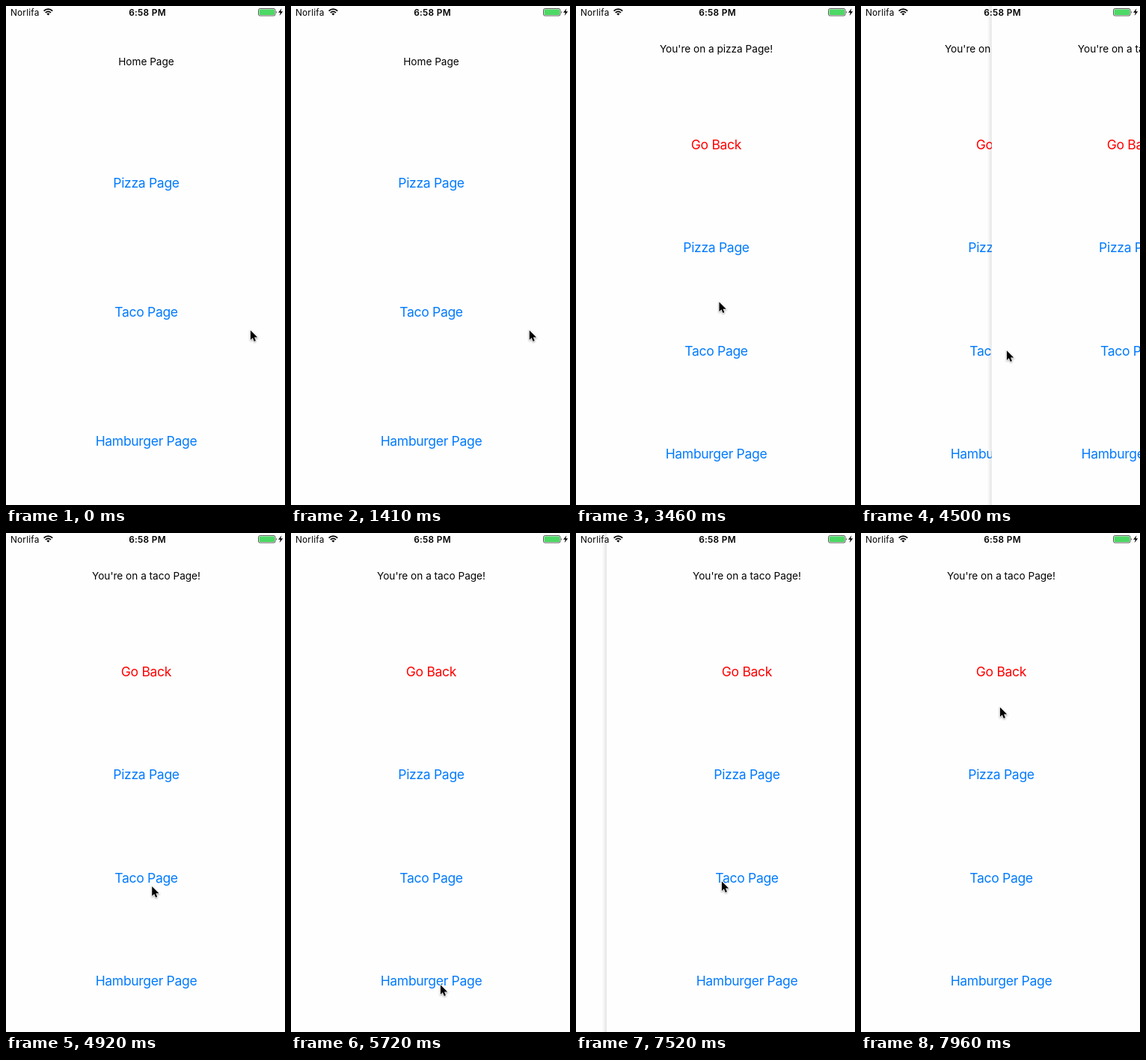
Recreate the animation shown at these times as an HTML page. Size 373 by 665 pixels, loop 8000 ms.

```html
<!DOCTYPE html>
<html lang="en">
<head>
<meta charset="utf-8">
<style>
html, body { margin: 0; width: 100%; height: 100%; overflow: hidden; background: #fefefe; }
svg { display: block; width: 373px; height: 665px; font-family: Inter, Roboto, sans-serif; }
.title { font-size: 13.6px; text-anchor: middle; }
.button { font-size: 17.5px; letter-spacing: -.3px; text-anchor: middle; fill: #007aff; }
.back { fill: #f00; }
.status { font-size: 11.8px; letter-spacing: .2px; }
.clock { font-weight: 600; text-anchor: middle; letter-spacing: .3px; }
#cursor { filter: drop-shadow(0 1px 1px rgba(0, 0, 0, .35)); }
</style>
</head>
<body>
<svg viewBox="0 0 373 665">
  <defs>
    <linearGradient id="edge">
      <stop offset="0" stop-opacity="0"/>
      <stop offset="1" stop-opacity=".1"/>
    </linearGradient>
  </defs>
  <g id="pages"></g>
  <g class="status">
    <text x="6" y="12.5">Norlifa</text>
    <text class="clock" x="189" y="12.5">6:58 PM</text>
    <g fill="none" stroke="#000" stroke-width="1.7">
      <path d="M50.6 6.6a8 8 0 0 1 11.6 0M52.8 9a5 5 0 0 1 7.2 0"/>
      <path d="M56.4 12.6l-2-2a2.8 2.8 0 0 1 4 0z" fill="#000" stroke="none"/>
    </g>
    <rect x="337.5" y="3.5" width="22.5" height="9.5" rx="2" fill="none" stroke="#333" stroke-width=".8"/>
    <rect x="338.5" y="4.5" width="20.5" height="7.5" rx="1" fill="#4cd964"/>
    <path d="M361 6.5q1.6 1.7 0 3.5z" fill="#222"/>
    <path d="M368.4 3.2l-4.4 5.6h2.8l-1.2 4.2 4.6-5.8h-2.9z"/>
  </g>
  <path id="cursor" d="M.9 1.2V14l2.9-2.7 2 4.6 2.1-.9-1.9-4.5h4.2z" stroke="#fff" stroke-width="1.4" paint-order="stroke"/>
</svg>
<script>
const LOOP = 8000, WIDTH = 373, SLIDE = 500;
const FOODS = ["Pizza", "Taco", "Hamburger"];

// Each visit: page food, slide start, and the button pressed on it.
const visits = [
  { start: -SLIDE, press: 0, pressedAt: 2470 },
  { food: "pizza", start: 2706, press: 1, pressedAt: 4270 },
  { food: "taco", start: 4401, press: 2, pressedAt: 5950 },
  { food: "hamburger", start: 6162, press: 1, pressedAt: 7170 },
  { food: "taco", start: 7322 }
];

// Cursor tip: time, x, y
const cursorPath = [
  [0, 326, 431], [110, 326, 431], [120, 325, 431], [1350, 325, 431],
  [1410, 318, 431], [1990, 187, 233], [3100, 187, 233], [3510, 191, 407],
  [3950, 194, 458], [4850, 194, 458], [5200, 198, 600], [5340, 199, 632],
  [5650, 199, 601], [6400, 199, 601], [6760, 194, 477], [7110, 194, 463],
  [7560, 194, 463], [7950, 185, 231], [LOOP, 185, 231]
];

const text = (kind, y, label) => `<text class="${kind}" x="187.5" y="${y}">${label}</text>`;

function pageMarkup({ food }) {
  const heading = food
    ? text("title", 62, `You're on a ${food} Page!`) + text("button back", 190.7, "Go Back")
    : text("title", 78.6, "Home Page");
  const [top, gap] = food ? [328.2, 137.5] : [242.2, 172];
  const buttons = FOODS.map((name, i) => text("button food", top + i * gap, name + " Page"));
  return `<g><rect x="-6" width="6" height="665" fill="url(#edge)"/>
    <rect width="${WIDTH}" height="665" fill="#fefefe"/>${heading}${buttons.join("")}</g>`;
}

const pagesGroup = document.getElementById("pages");
const cursor = document.getElementById("cursor");
pagesGroup.innerHTML = visits.map(pageMarkup).join("");
visits.forEach((visit, i) => {
  visit.node = pagesGroup.children[i];
  visit.button = visit.node.querySelectorAll(".food")[visit.press];
  visit.end = visits[i + 1]?.start ?? LOOP;
});

const bezier = (s, a, b) => 3 * (1 - s) ** 2 * s * a + 3 * (1 - s) * s * s * b + s ** 3;

function slideEase(p) {
  if (p <= 0 || p >= 1) return p <= 0 ? 0 : 1;
  let low = 0, high = 1;
  for (let i = 0; i < 24; i++) {
    const mid = (low + high) / 2;
    if (bezier(mid, .36, .04) < p) low = mid; else high = mid;
  }
  return bezier(low, .66, 1);
}

const secant = (i, axis) => {
  const a = cursorPath[i], b = cursorPath[i + 1];
  return a && b ? (b[axis] - a[axis]) / (b[0] - a[0]) : 0;
};

// Monotone tangents keep the cursor smooth without overshoot.
const tangent = (i, axis) => {
  const a = secant(i - 1, axis), b = secant(i, axis);
  return a * b > 0 ? 2 * a * b / (a + b) : 0;
};

function cursorAt(t, axis) {
  const i = cursorPath.findIndex(key => key[0] > t) - 1;
  const a = cursorPath[i], b = cursorPath[i + 1];
  const span = b[0] - a[0], u = (t - a[0]) / span, v = 1 - u;
  return a[axis] * (1 + 2 * u) * v * v + b[axis] * u * u * (3 - 2 * u)
    + span * u * v * (tangent(i, axis) * v - tangent(i + 1, axis) * u);
}

function draw(t) {
  for (const { node, button, start, end, pressedAt } of visits) {
    const x = WIDTH * (1 - slideEase((t - start) / SLIDE));
    node.setAttribute("transform", `translate(${x})`);
    node.style.display = t >= start && t < end + SLIDE ? "" : "none";
    if (button) button.style.opacity = t >= pressedAt && t < end ? .2 : 1;
  }
  cursor.setAttribute("transform", `translate(${cursorAt(t, 1)} ${cursorAt(t, 2)})`);
}

const began = performance.now();
function tick() {
  draw((performance.now() - began) % LOOP);
  requestAnimationFrame(tick);
}
tick();
</script>
</body>
</html>
```
